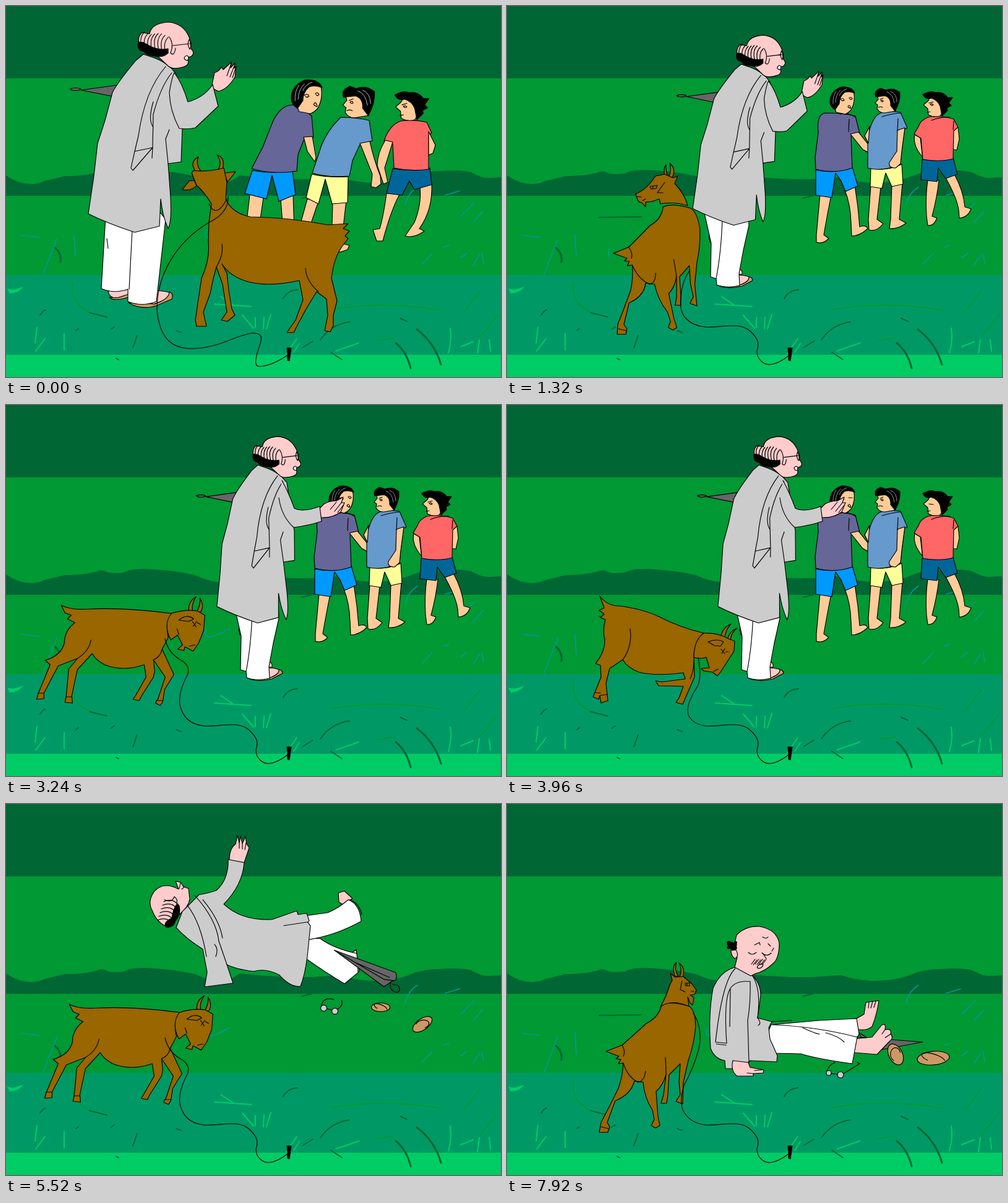
An HTML page with a canvas that plays this animation: 800 px wide and 600 px high, repeating every 8 s.

```html
<!DOCTYPE html>
<html lang="en">
<head>
<meta charset="utf-8">
<title>Goat in the meadow</title>
<style>
html,body{margin:0;width:100%;height:100%;overflow:hidden;background:#063}
canvas{display:block;width:800px;height:600px}
</style>
</head>
<body>
<canvas id="stage" width="800" height="600"></canvas>
<script>
const c = document.getElementById('stage').getContext('2d');
const SKIN = '#fc9', PINK = '#fcc', COAT = '#ccc', GOAT = '#960', DARK = '#063', GREEN = '#093', TAN = '#c96';
const LOOP = 8000, STEP = 120;
let lw = 1.15;

const clamp = v => Math.max(0, Math.min(1, v));
const mix = (a, b, k) => a + (b - a) * k;
const span = (t, a, b) => clamp((t - a) / (b - a));
const cache = new Map();
function path(d) {
  if (!cache.has(d)) cache.set(d, new Path2D(d));
  return cache.get(d);
}
function shape(d, fill) {
  const p = path(d);
  if (fill) { c.fillStyle = fill; c.fill(p); }
  c.strokeStyle = '#000';
  c.lineWidth = lw;
  c.stroke(p);
}
const line = d => shape(d);
function flat(d, fill) { c.fillStyle = fill; c.fill(path(d)); }
function strokes(d, color, w) {
  c.strokeStyle = color;
  c.lineWidth = w;
  c.stroke(path(d));
}
function oval(x, y, rx, ry, a, fill) {
  c.beginPath();
  c.ellipse(x, y, rx, ry, a, 0, 7);
  c.fillStyle = fill;
  c.fill();
  c.strokeStyle = '#000';
  c.lineWidth = lw;
  c.stroke();
}
// Run draw() with point (ax, ay) moved to (x, y) and scaled, keeping hairlines thin.
function place(ax, ay, x, y, sx, sy, skew, draw) {
  const old = lw;
  c.save();
  c.transform(sx, 0, skew, sy, x, y);
  c.translate(-ax, -ay);
  lw = old / sx;
  draw();
  c.restore();
  lw = old;
}
const shift = (x, y, draw) => place(0, 0, x, y, 1, 1, 0, draw);

function meadow() {
  [[0, DARK], [117, GREEN], [307, GREEN], [435, '#096'], [564, '#0c6']].forEach(([y, f]) => {
    c.fillStyle = f;
    c.fillRect(0, y, 800, 600 - y);
  });
  flat('M0 274Q20 288 42 288 55 287 62 283L95 275Q130 275 150 268 157 266 163 270 170 273 190 271 200 265 225 265 270 267 305 275 330 287 355 287 365 283 378 274 440 281 495 280 530 277 540 277 565 285 590 286 630 286 655 275 675 267 700 267 735 264 752 269 770 279 780 278L800 277V307H0Z', DARK);
  strokes('M25 371L53 374M82 377L60 434M110 370l2 35M164 392l1 16M645 322Q650 302 665 293M710 306L733 299M672 418L689 400M735 340L757 318M707 390l9-3M735 407l10-7M755 419l10-16M769 400l3 16M755 350l16-18M323 362Q320 376 330 375 345 372 360 362', '#099', 1.6);
  strokes('M108 447Q104 465 115 480 124 491 137 496M527 491Q610 476 703 492M740 495L767 460M767 535L795 500M600 541L628 537M393 347L420 338', GREEN, 2);
  strokes('M135 496L163 503M149 342L217 341M448 473Q455 460 471 459M478 311L494 307M508 540Q525 515 555 511M637 505l11 5M212 533L205 553M178 570l4 2M275 525l8 3M169 523l6-4M525 560L543 572M55 500Q62 490 64 492M480 552l16-10M113 525l4-3', DARK, 2);
  strokes('M79 391Q90 400 88 414M664 523Q693 545 703 580M630 545Q648 560 654 586', DARK, 3);
  strokes('M337 482L396 486M347 470L368 484M48 558L63 538M50 520L47 545M94 530V556M382 500L400 521M428 499L421 522M403 504V520M417 503L416 522M718 521Q721 540 715 561M765 540L762 562M781 540L783 558M735 551L755 543M452 564L470 538M465 560L474 546M533 558L570 545', '#0c6', 2);
  flat('M2 457L12 459 28 454Q20 465 6 465Z', '#0c6');
}

// ---- boys ----
const boys = [
  {
    from: [486, 147], at: [542, 153], far: [642, 182], head: 1.25, shirt: '#669', pants: '#09f',
    run: {
      legs: 'M394 305L387 365H408L416 310ZM444 313L448 365H466L464 305Z',
      arms: 'M481 212L495 211 501 245 499 252 487 235Z',
      pants: 'M398 266Q430 272 463 266L468 305 441 316 430 274 421 312 386 303Z',
      shirt: 'M463 160Q445 160 432 185L415 228 397 263Q430 273 470 267L472 240 482 215 497 213 494 178Q480 165 463 160Z'
    },
    stand: {
      legs: 'M506 304L500 370 500 382Q510 386 520 376L512 370Q518 335 524 306ZM546 298Q555 320 556 350L557 372Q570 372 583 360 580 353 570 357L567 325 562 290Z',
      arms: 'M555 207L568 204 584 224Q588 235 584 237L575 232Z',
      pants: 'M499 265Q530 272 558 260L567 291 547 300 540 283 531 270 525 310 499 306Z',
      shirt: 'M514 173Q500 175 503 205L498 245 499 264Q530 272 558 262L556 210 570 206 563 178Q545 173 514 173Z'
    },
    folds: 'M538 175Q552 172 563 180M553 183l-1 20',
    face(shut) {
      shape('M530 140L560 137Q564 155 556 168 548 177 543 174L532 172 528 160Z', SKIN);
      shape('M522 155Q522 138 540 131 558 130 562 141 552 137 545 140 537 147 537 158L530 168Q522 162 522 155Z', '#000');
      strokes('M532 138Q526 146 527 158M539 136Q531 144 531 156M549 134Q540 137 537 145', '#ccc', .7);
      line(shut ? 'M539 152l6 1M552 150l6 0M551 163q2-5 4 0t-4 0' : 'M539 151q4-3 6 1q-3 3-5 0M553 149q3-3 5 1q-2 3-4 0M542 153h1M555 151h1M551 163q2-5 4 0t-4 0');
    }
  },
  {
    from: [570, 154], at: [615, 152], far: [709, 179], head: 1.28, shirt: '#69c', pants: '#ff9',
    run: {
      legs: 'M487 312L475 355 490 360 505 316ZM528 316L526 388 540 398 552 394 555 387 542 384 550 314Z',
      arms: 'M572 222L588 219Q595 250 605 275L606 288 598 294 590 292 592 272Z',
      pants: 'M494 272Q520 278 553 276L552 318 527 320 516 280 505 320 485 310Z',
      shirt: 'M541 180Q520 200 510 225L495 270Q520 278 555 275L560 250 572 224 592 218 587 185Q565 180 541 180Z'
    },
    stand: {
      legs: 'M588 290L584 345 585 362Q597 366 608 352L598 345 604 293ZM622 289L620 345 618 360Q633 361 645 351L634 345 639 287Z',
      arms: 'M586 195L578 210 584 222ZM631 201L643 197 638 235 636 255 628 262Q616 262 618 253L630 235Z',
      pants: 'M588 262Q612 268 638 256L640 288 622 292 612 270 606 295 587 292Z',
      shirt: 'M604 173Q590 178 583 212L583 262Q605 268 630 258L632 205 647 197 636 172Q620 169 604 173Z'
    },
    folds: 'M606 179Q622 174 636 173M632 182l-1 20',
    face() {
      shape('M599 146L600 151 595 157 599 160 598 166Q602 173 610 173L628 170 620 145Z', SKIN);
      shape('M596 147Q592 138 604 133L612 136Q625 131 635 140 636 155 627 170L620 161Q621 148 610 145Z', '#000');
      strokes('M614 139Q624 142 626 157M620 138Q630 142 630 155', '#ccc', .7);
      line('M603 151l5-2M604 153q3-2 4 1q-2 2-4-1M600 164q4-2 7 0');
    }
  },
  {
    from: [656, 161], at: [696, 158], far: [788, 180], head: 1.15, shirt: '#f66', pants: '#069',
    run: {
      legs: 'M615 303Q610 340 604 360L593 362 599 380 609 380Q622 330 637 303ZM669 293Q672 320 660 350L645 372Q660 376 676 364L668 360Q690 330 688 287Z',
      arms: 'M613 217Q600 238 600 258L610 288 617 285 612 262 625 220ZM683 203L694 225 690 238 683 241Z',
      pants: 'M625 263Q655 268 685 262L688 289 660 297 652 283 640 306 615 303Z',
      shirt: 'M638 186Q620 192 611 218L625 223 627 262Q655 268 683 264L683 210 688 205 680 188Q660 183 638 186Z'
    },
    stand: {
      legs: 'M680 281Q676 310 678 340L680 355Q690 356 695 343L687 340Q695 310 698 282ZM709 278Q727 310 730 330L731 343Q745 342 750 328L740 325Q738 300 723 272Z',
      arms: 'M659 208Q655 225 672 245L671 240 668 213ZM721 198L729 196 731 215 727 233 721 232Z',
      pants: 'M671 248Q700 253 721 246L728 272 709 279 697 262 695 284 669 281Z',
      shirt: 'M680 180Q668 185 665 195L658 207 669 214 672 248Q700 253 721 247L722 202 729 196 722 183Q700 176 680 180Z'
    },
    folds: 'M686 185Q700 179 716 180M722 186l-1 14',
    face(shut) {
      shape('M684 147L681 153 673 160 680 166 681 176Q690 181 700 178L708 165 697 148Z', SKIN);
      shape('M672 143Q685 136 692 140 705 138 712 148L720 148 714 157 718 161 711 165 712 169 703 178 700 162Q696 152 686 149 676 152 672 143Z', '#000');
      line(shut ? 'M682 160l7 1M679 172l5-1' : 'M682 157l7-2M684 159q3-2 5 1q-3 2-5-1M679 172l5-1');
    }
  }
];
function drawBoys(t) {
  const k = span(t, 0, 840), shut = t / STEP % 12 === 9;
  const q = Math.max(0, (t - 4200) / 720), away = Math.min(1, q);
  boys.forEach(b => {
    let [x, y] = [0, 1].map(i => mix(mix(b.from[i], b.at[i], k), b.far[i], away));
    x += Math.max(0, q - 1) * 330;
    if (x > 850) return;
    const running = k < .5, pose = running ? b.run : b.stand, a = running ? b.from : b.at;
    const s = (running ? 1 - .15 * k : 1 + .17 * (1 - k)) * (1 - .39 * away);
    place(...a, x, y, s, s, 0, () => {
      shape(pose.legs, SKIN);
      if (!running) shape(pose.arms, SKIN);
      shape(pose.pants, b.pants);
      shape(pose.shirt, b.shirt);
      if (running || b === boys[0] || b === boys[1]) shape(pose.arms, SKIN);
      if (!running) line(b.folds);
    });
    const hs = mix(b.head, 1, k) * (1 - .39 * away);
    place(...b.at, x, y, hs, hs, 0, () => b.face(shut));
  });
}

// ---- goat ----
function goatAway() {
  shape('M306 267Q296 252 311 244 306 256 315 267ZM343 264Q350 252 341 241 355 245 350 264Z', GOAT);
  shape('M304 282L296 283 285 297Q300 300 308 290ZM353 270L371 268 358 285Z', GOAT);
  shape('M303 266Q325 269 352 262L357 285 355 312Q365 335 395 341 460 342 520 354L553 352 545 360 555 364 548 372 553 376 546 385Q530 405 526 440L535 477 529 500 529 517 524 527 515 525 520 500 518 474 502 462 485 490 470 518 465 528 454 528 468 508 480 475 474 444Q420 456 385 444 360 435 349 417L357 432 360 460 365 490 370 500 358 510 348 508 357 495 350 450 340 422Q335 440 330 465L319 495 324 518 308 518 306 508 316 440Q330 410 327 380L328 350 332 320Q320 300 308 290L300 270Z', GOAT);
  line('M349 385Q352 402 340 422M484 424Q485 445 505 462M328 320Q340 345 357 312');
}
function goatRump() {
  shape('M250 325Q245 345 225 355 200 378 186 390L160 400 181 408 176 412 184 413 180 420 188 419Q187 440 180 460L165 490 152 515 149 531 163 531 166 522 162 515 175 480Q200 470 206 448L220 450Q222 475 235 495L238 510 233 520 240 524 247 520 244 505 241 465Q252 455 257 438L253 470 249 484 258 484 260 470 262 438 280 420 278 450 280 470 273 481 284 485 285 450 293 415Q302 390 305 360 304 332 294 327 265 318 250 325Z', GOAT);
  line('M188 419Q195 442 212 450 222 448 224 432M186 390Q192 400 188 408M256 410Q257 425 257 438M152 522l12 3');
}
function goatLeft() {
  place(0, 400, 12, 400, 1, 1, .13, goatRump);
  shape('M255 275Q252 262 257 257 256 268 261 277ZM262 276Q266 264 263 254 274 264 267 277Z', GOAT);
  shape('M248 320L246 312Q232 318 224 317L224 325 218 318Q213 318 211 313L208 304Q222 298 232 286L240 275 255 272 268 278 276 275 271 287Q288 305 292 323 270 316 248 320Z', GOAT);
  line('M231 292l12-2-2 5-8 1zM236 292v3M255 285L243 302 252 302M209 308l8 1M219 315l5-3');
}
function goatRight() {
  goatRump();
  shape('M271 278Q266 262 274 256 270 268 277 279ZM279 280Q284 268 278 257 289 265 284 281Z', GOAT);
  shape('M248 328Q258 310 263 293L267 285 264 274 272 280 285 279 299 291 306 301 303 308 296 309 302 313 300 325 296 322 292 312 294 327Q265 315 248 328Z', GOAT);
  line('M288 290l7-1 0 5-6 0zM291 290v3M283 286L280 300 288 304M298 303h4');
}
function goatButt() {
  shape('M150 309Q162 325 182 325 220 330 245 342 280 360 318 369 303 385 302 408L303 440 290 470 284 484 273 481 278 474 285 455 245 454 240 446 250 448 288 443 285 433Q240 439 213 432 195 425 187 412L166 426 160 450 163 478 152 482 150 470 148 476 139 472 152 440 151 421 143 418Q158 400 158 380 154 365 159 347L151 344 157 338 149 332 157 328Z', GOAT);
  line('M199 362Q203 390 187 412M302 415Q302 430 296 443M150 470l12-2M143 465l8 1');
  shape('M345 376Q348 360 362 354 352 365 352 378ZM356 379Q360 365 372 361 362 368 361 381Z', GOAT);
  shape('M318 369Q340 368 358 378L368 382 367 398 345 432 340 438 332 432 318 430 314 426 327 425 322 408Q310 412 302 408 302 380 318 369Z', GOAT);
  line('M325 383Q340 377 350 383L345 390 335 389ZM346 395l6 7M352 394l-5 8M354 399l4 0M334 431l7-4');
}
function goatSide() {
  shape('M80 324Q95 332 125 330 180 327 258 337 248 355 253 376L243 395 262 436 247 460 244 480 240 486 232 482 236 476 248 440 229 412 231 430 229 440 210 470 206 478 196 476 200 470 217 440 214 420Q180 432 150 420 135 412 130 402L106 428 97 470 98 482 86 481 88 470 92 427 106 410Q90 416 75 422L52 466 52 475 40 476 43 466 62 420 54 413Q80 405 85 385 85 365 102 352L90 346 96 340 86 336Z', GOAT);
  line('M128 380Q125 398 106 410M229 412Q240 408 243 395M42 466h10M87 472h10M233 478l11 0');
  shape('M286 332Q285 318 298 310 290 322 292 333ZM299 334Q306 322 304 312 312 325 305 335Z', GOAT);
  shape('M258 337Q280 330 300 333L312 340 310 365 302 385 293 398 280 391 278 397 268 395 276 388 268 372 257 380Q244 355 258 337Z', GOAT);
  line('M270 348Q283 337 294 346L286 350ZM292 350l6 9M299 350l-6 8M300 352l5 3M267 362l3 9M287 390l9-2');
}
function drawGoat(t) {
  if (t < 960) goatAway();
  else if (t < 1560) goatLeft();
  else if (t < 2760 || t >= 5760) goatRight();
  else if (t < 3600) shift(mix(28, 0, span(t, 2760, 3480)), 0, goatSide);
  else if (t < 4440) shift(mix(-80, 0, span(t, 3600, 3960)), 0, goatButt);
  else shift(t < 4920 ? mix(60, 0, span(t, 4440, 4800)) : mix(0, 28, span(t, 5040, 5640)), 0, goatSide);
}
const ROPE_END = ' 320 519C345 521 375 510 392 525S407 548 404 558C404 572 415 580 425 580Q440 578 456 565';
function drawRope(t) {
  let d = 'M301 338Q318 365 309 400 300 430 286 455 277 485 287 500 298 516';
  if (t < 960) return line('M359 308Q360 335 328 350C270 385 244 440 244 490C248 540 270 554 300 554C345 554 375 530 400 529C420 529 411 545 407 558C402 575 402 583 410 583Q430 582 456 564');
  if (t < 1560) d = 'M295 428Q283 445 281 470 278 495 290 506 300 517';
  else if (t >= 3600 && t < 4440) d = 'M309 408Q315 440 308 455 285 490 295 505 302 516';
  else if (t >= 2760 && t < 5760) d = 'M257 378Q262 400 280 411 298 420 294 435 278 465 281 485 288 516';
  line(d + ROPE_END);
}

// ---- old man ----
const sandal = (x, y, rx, ry, a) => {
  oval(x, y, rx, ry, a, TAN);
  c.beginPath();
  c.ellipse(x, y, rx * .75, ry * .6, a + .4, 2, 6);
  c.stroke();
};
function head() {
  shape('M232 45Q235 28 262 26 288 28 297 53L299 69Q306 76 300 81L293 84Q298 95 288 98 270 104 262 97L246 82Q225 80 216 66 211 50 220 43Z', PINK);
  shape('M214 58Q211 72 222 73 228 81 240 80 252 85 262 76L262 69Q250 72 235 66L222 59Z', '#000');
  for (let i = 0; i < 8; i++) {
    const x = 220 + i * 5.5, y = 42 + Math.sin(i) * 2 + i;
    line(`M${x + 4} ${y}Q${x - 5} ${y + 8} ${x - 1} ${y + 25}`);
  }
  line('M264 50Q272 62 266 76 272 82 274 68M270 64L296 61M296 54Q292 62 297 70 302 60 296 54');
  shape('M288 84Q291 78 295 82L294 88Q289 88 288 84Z', '#fff');
}
function strolling(t) {
  const k = span(t, 0, 1560), there = k === 1, s = 1 - .14 * k;
  const body = draw => place(222, 78, mix(222, 407, k), mix(78, 97, k), s, 1 - .113 * k, there ? .04 : 0, draw);
  body(() => {
    shape('M121 136L180 128 177 147Z', '#666');
    shape('M104 134Q112 131 121 134 118 138 106 136Z', '#666');
    if (k >= .7) return;
    shape('M165 461Q167 473 180 472L200 466V456Z', PINK);
    shape('M167 471Q175 479 201 470L198 466 180 472Z', TAN);
    shape('M240 460Q262 461 268 465 272 471 258 475L236 483Z', PINK);
    shape('M198 480Q220 493 245 484L268 474Q272 466 264 462 264 474 240 482Z', TAN);
    shape('M161 340L154 457Q175 466 197 458L197 478Q220 487 243 478L258 345 250 335Z', '#fff');
    line('M204 362L199 458M163 376l2 16');
  });
  if (k >= .7) shift(-325 * (1 - k), 65 * (1 - k), () => {
    shape('M425 416Q431 416 430 424L424 424Z', PINK);
    shape('M424 425Q440 425 447 432 440 440 422 443Z', PINK);
    shape('M389 441Q405 449 430 443L447 434Q446 428 441 428 442 436 424 442Z', TAN);
    shape('M369 325L380 374 379 428 388 431 389 441Q405 447 426 442L425 423 432 385 441 345 440 320Z', '#fff');
    line('M398 335Q396 390 388 431M376 362l2 10');
  });
  body(() => {
    shape('M222 78L210 88Q180 124 172 140L160 185 148 222 142 275 133 336Q165 352 208 366L248 356 250 312Q253 340 262 360 268 350 266 310L262 255 283 252 285 198 275 110Q262 92 240 84Z', COAT);
    line('M258 98Q224 138 214 210L208 235 202 262 205 266 237 229 238 175Q250 130 268 108M238 155Q229 185 238 196M208 235L237 229 236 246M262 255L258 215 264 200');
    head();
    if (there) return;
    shape('M332 132L337 108Q345 105 348 99L351 103 364 91 363 100 370 92 369 101 372 97 370 115Q358 135 343 138Z', PINK);
    line('M364 93L357 113M370 94L362 115M372 98L366 116');
    shape('M272 108Q285 125 294 155 320 148 334 127L343 162 306 197Q295 200 280 198 265 170 264 140 268 115 272 108', COAT);
  });
  if (there) {
    shape('M506 168L514 160Q523 155 534 155L545 149 542 158 547 158 541 173Q528 183 509 182Z', PINK);
    line('M534 157L524 169M542 158L531 172M545 162L536 174');
    shape('M446 122Q456 140 466 167 480 174 507 164L510 188Q490 195 465 198 445 180 441 150', COAT);
  }
}
function thrown(t) {
  const k = span(t, 4320, 4920), u = span(t, 4920, 6000), dy = -300 * u + 400 * u * u;
  const fly = (x, y, x2, y2) => [mix(mix(430, x, k), x2, u), mix(mix(300, y, k), y2, u)];
  c.save();
  c.translate(410, 250 + dy);
  c.rotate(1.2 * (1 - k));
  c.translate(-410, -250);
  shape('M537 187L547 184 560 196 545 206 538 202Z', PINK);
  shape('M558 284L566 279 571 314 563 318 566 299Z', PINK);
  shape('M486 260L508 261Q530 277 567 285L569 316 547 334Q515 315 480 290Z', '#fff');
  shape('M484 224L520 219Q540 210 553 198 572 205 574 233 530 257 486 263Z', '#fff');
  line('M555 198Q570 202 575 222');
  shape('M279 181Q255 168 240 184 228 200 236 215 242 232 256 240L280 222Q295 210 297 197L295 180 287 177 282 170 274 168Z', PINK);
  shape('M277 204Q270 212 268 228 254 234 258 242 270 245 274 232 283 222 280 208Z', '#000');
  for (let i = 0; i < 6; i++) line(`M${255 - i * 2} ${201 + i * 6}q14 -6 22 4`);
  line('M256 198Q268 204 272 193 278 198 276 203M282 171l-2 9M284 181q6-4 2-5');
  shape('M361 134Q361 115 371 108L374 94 377 106 379 95 382 107 387 96 389 108 393 114 385 138Z', PINK);
  line('M377 104v11M382 105v11M388 106l-2 11');
  shape('M297 205L312 190Q325 188 340 183 360 165 359 133L385 138Q382 175 352 205 380 232 430 230L470 216 472 222 486 220 490 232 488 235 492 240 487 290Q483 320 476 338 460 340 442 320 420 308 400 314 370 310 357 303L367 333 321 339 325 315 318 278Q290 260 275 243L285 217Z', COAT);
  line('M306 192Q340 230 344 265L357 303M293 207Q315 235 324 290M318 198Q345 230 350 260M449 240L488 234M337 270Q344 278 339 290');
  c.restore();
  sandal(...fly(580, 236, 626, 403), 15, 7, 0);
  shift(...fly(0, 0, 10, 245), () => {
    oval(508, 194, 5, 5, 0, COAT);
    oval(526, 199, 5, 5, 0, COAT);
    line('M513 195l8 2M504 190Q508 175 524 180M530 196Q540 190 537 182');
  });
  const [ux, uy] = fly(550, 160, 600, 350);
  place(550, 160, ux, uy, 1, 1, 0, () => {
    shape('M503 131L602 167Q606 180 598 180L583 190Z', '#666');
    line('M503 131L583 178 598 180M535 150L592 175M594 183Q590 195 603 199 612 198 606 188L597 186');
  });
}
function looseSandal(t) {
  const k = span(t, 4320, 4920), u = span(t, 4920, 6000);
  sandal(mix(mix(430, 653, k), 689, u), mix(mix(400, 288, k), 411, u), 9, 18, .4 + u);
}
function lying() {
  shape('M566 388L608 380 672 385 567 398Z', '#666');
  sandal(626, 403, 23, 11, -.1);
  sandal(689, 411, 26, 11, -.1);
  oval(518, 439, 5, 5, 0, COAT);
  oval(533, 427, 5, 5, 0, COAT);
  line('M515 436L514 420Q511 414 508 418M537 423L544 396Q543 390 538 394M522 435l7-5');
  shape('M303 350L315 368 314 390 320 412 298 408Z', COAT);
  shape('M548 346L578 332 574 310Q577 302 584 306 592 300 596 312L592 332 595 350Q585 358 555 352Z', PINK);
  line('M584 306l1 8M590 305l-2 9');
  shape('M556 367Q580 370 602 368L612 363 613 372 608 388 590 391 552 386Z', PINK);
  line('M602 374l10-2M602 380l9-2');
  shape('M313 352Q330 345 340 346L352 323Q390 340 428 346L425 392 434 404 414 412Q440 425 458 428L455 432Q430 436 405 425 380 420 356 400 335 388 325 392 318 365 313 352Z', COAT);
  shape('M413 357L430 350 425 400 411 388Z', PINK);
  shape('M428 346Q465 330 500 325L552 326 546 338 568 345 571 352 556 388Q530 392 515 388 490 395 480 410L448 416Q425 395 426 370Z', '#fff');
  line('M428 385Q435 362 460 352 500 335 571 355M500 327Q525 328 540 335M499 352Q508 358 496 371 492 366 502 360');
  shape('M410 413L424 402 448 406 448 424Q430 428 420 419Z', PINK);
  line('M430 412l12 4M428 416l10 6M344 348Q362 365 370 380L428 405M352 330l20 16 2-12M390 345l15 10M385 372q15-2 10 10');
  shape('M299 290Q315 281 328 292L336 288Q343 293 341 301L338 305Q345 312 346 318L352 324Q350 340 340 346 315 362 303 345 296 320 299 290Z', PINK);
  line('M303 335Q315 330 315 343 308 350 303 342M319 297q5-6 9 0t-9 0M328 302l5 4M332 306l2 10M337 305l3 8M334 318q6-4 11-1M312 290q6-4 12-1');
  flat('M334 306l10 5-2 5-8-4Z', '#000');
}
function sitting() {
  shape('M566 368L582 378 672 385 590 400Z', '#666');
  sandal(628, 405, 11, 18, -.45);
  sandal(689, 411, 26, 11, -.1);
  oval(520, 435, 4, 4, 0, COAT);
  oval(539, 438, 5, 5, 0, COAT);
  line('M524 436l10 1M517 432Q520 422 530 418M544 436L570 420 566 418');
  shape('M563 348L577 340 580 321 586 320 601 318Q598 340 590 360 580 368 565 364Z', PINK);
  line('M585 321l-1 9M591 319l-3 11M596 319l-3 10');
  shape('M560 380L590 377 606 357Q613 354 611 365 622 362 620 372 626 378 618 384L598 405 560 402Z', PINK);
  line('M611 365l-5 7M620 372l-9 6');
  shape('M427 357L505 350 565 347 569 372 566 377 558 420Q500 412 475 404L432 403Q415 380 427 357Z', '#fff');
  line('M430 357Q500 360 566 377L580 378M478 362Q500 372 505 372M515 370Q535 375 545 385');
  shape('M369 264Q345 270 333 298 325 340 329 395 335 412 352 415L353 428 368 428 388 420 393 415 436 417 437 407 425 380 423 362 428 352 405 346 410 310Q410 290 397 278Z', COAT);
  shape('M371 212Q385 197 408 198 436 203 440 225 440 250 430 258 415 272 402 274L394 278 368 264 372 248 365 240Z', PINK);
  shape('M362 236Q362 246 368 250 376 246 370 236Z', PINK);
  for (let i = 0; i < 9; i++) oval(359 + i * 5 % 15, 224 + i * 7 % 13, 3, 2, i, '#000');
  line('M390 240q6 6 13 0M412 241q8 7 15 0M428 238l3-5M413 241l6 9M400 228l8-4 1 4M413 215q6 4 9 0M422 226l4 4M404 264q5-8 10-4-2 6-8 6z');
  for (let i = 0; i < 7; i++) line(`M${401 + i * 3} ${251 + i % 2}l-6 8`);
  line('M369 266Q348 285 337 385L355 387Q350 315 361 298 370 285 393 287 394 320 389 350L391 418M397 278Q411 300 405 346M428 352L460 350M361 298L360 360M405 346Q412 355 406 358M338 388l16 2');
  shape('M365 415Q361 432 372 440L398 440 398 436 414 435 415 430 393 426 390 418Z', PINK);
  line('M398 436l-10-1M400 431l12-1');
}
function drawMan(t) {
  if (t < 4320) strolling(t);
  else if (t < 6120) thrown(t);
  else if (t < 6840) lying();
  else sitting();
}

function frame(now) {
  const t = Math.floor(now % LOOP / STEP) * STEP;
  c.lineJoin = c.lineCap = 'round';
  meadow();
  if (t >= 4320 && t < 6120) looseSandal(t);
  drawBoys(t);
  const layers = t < 1680 ? [drawGoat, drawMan] : [drawMan, drawGoat];
  layers.forEach(draw => draw(t));
  drawRope(t);
  shape('M454 553H461L458 574 455 573 455 563Z', '#000');
  requestAnimationFrame(() => frame(performance.now()));
}
frame(performance.now());
</script>
</body>
</html>
```
